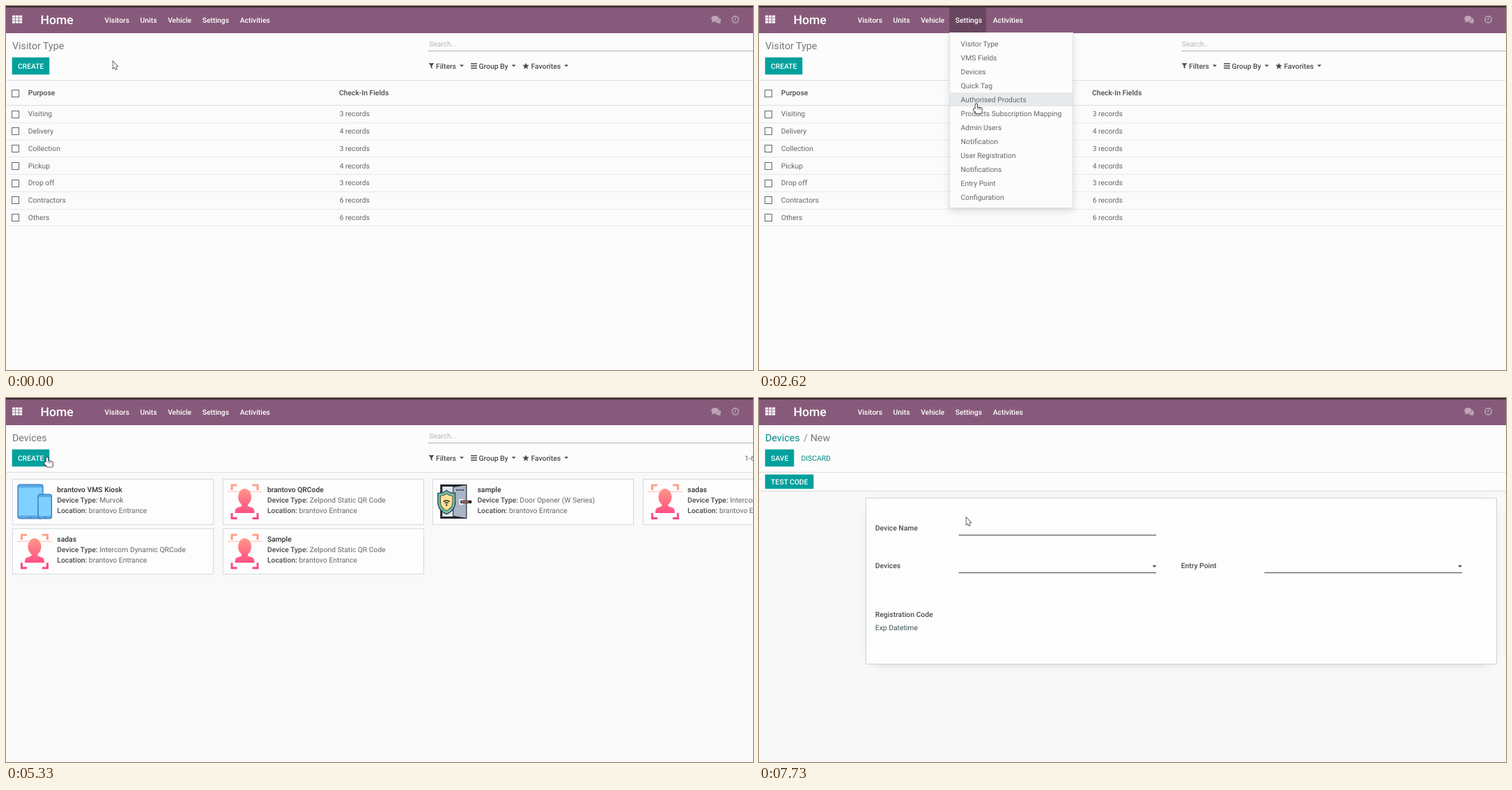
Animation, 1072 px wide and 522 px high, one loop 8 s. Source, as an HTML page with a canvas:

```html
<!DOCTYPE html>
<html lang="en">
<head>
<meta charset="utf-8">
<title>Device settings</title>
<style>
  html, body { margin: 0; width: 100%; height: 100%; overflow: hidden; background: #fcfcfc; }
  canvas { display: block; width: 1072px; height: 522px; }
</style>
</head>
<body>
<canvas id="stage" width="1072" height="522"></canvas>
<script>
const ctx = document.getElementById('stage').getContext('2d');
ctx.textRendering = 'geometricPrecision';
const WIDTH = 1072, HEIGHT = 522, LOOP = 8000;
const NAV = 39, HEAD = 106, BODY_SIZE = 10.35, TITLE_SIZE = 14.25;
const PURPLE = '#875a7b', TEAL = '#00a09d', DEEP_TEAL = '#008784', INK = '#666', DARK = '#4c4c4c';
const FOCUS = 130, MENU_OPEN = 2000, MENU_CLOSE = 4180, DEVICES = 4410, PRESS = 5790, FORM = 6100;
const STEP = 78, BLINK = 520;

const between = (t, a, b) => t >= a && t < b;
const inside = (x, y, l, top, r, b) => x >= l && x < r && y >= top && y < b;
const blinkOn = (t, since) => Math.floor((t - since) / BLINK) % 2 === 0;

function rect(x, y, w, h, color) {
  ctx.fillStyle = color;
  ctx.fillRect(x, y, w, h);
}
function frame(x, y, w, h, color) {
  ctx.strokeStyle = color;
  ctx.lineWidth = 1;
  ctx.strokeRect(x + .5, y + .5, w - 1, h - 1);
}
function path(d, fill, stroke, width = 1) {
  const p = new Path2D(d);
  if (stroke) { ctx.strokeStyle = stroke; ctx.lineWidth = width; ctx.stroke(p); }
  if (fill) { ctx.fillStyle = fill; ctx.fill(p); }
}
function oval(x, y, rx, ry, fill, stroke, width = 1) {
  ctx.beginPath();
  ctx.ellipse(x, y, rx, ry, 0, 0, 2 * Math.PI);
  if (stroke) { ctx.strokeStyle = stroke; ctx.lineWidth = width; ctx.stroke(); }
  if (fill) { ctx.fillStyle = fill; ctx.fill(); }
}
function text(str, x, midY, color = INK, weight = 400, size = BODY_SIZE) {
  ctx.font = `${weight} ${size}px Roboto, sans-serif`;
  ctx.fillStyle = color;
  ctx.fillText(str, x, midY + size * 0.355);
  return ctx.measureText(str).width;
}
const label = (str, x, y) => text(str, x, y, DARK, 500);
const title = (str, x, color = '#777') => text(str, x, 57, color, 400, TITLE_SIZE);
const rule = (y, color = '#dcddde') => rect(0, y, WIDTH, 1, color);
const arrowDown = (x, y) => path(`M${x - 3} ${y - 1.5}h6l-3 3z`, DARK);

function at(x, y, draw) {
  ctx.save();
  ctx.translate(x, y);
  draw();
  ctx.restore();
}
function raised(x, y, w, h, alpha, blur, dy) {
  ctx.save();
  ctx.shadowColor = `rgba(0,0,0,${alpha})`;
  ctx.shadowBlur = blur;
  ctx.shadowOffsetY = dy;
  rect(x, y, w, h, '#fcfcfc');
  ctx.restore();
}

const easeOut = power => p => 1 - (1 - p) ** power;
const smooth = p => p * p * (3 - 2 * p);
const REST = { x: 153, y: 79 };
const MOVES = [
  { from: 510, until: 1130, x: 282, y: 31, bend: -20, ease: easeOut(5) },
  { from: 2460, until: 2860, x: 318, y: 162, ease: easeOut(2.6) },
  { from: 2940, until: 3310, x: 319, y: 85, ease: smooth },
  { from: 3480, until: 3860, x: 317, y: 89, ease: smooth },
  { from: 4870, until: 5490, x: 56, y: 85, bend: 5, ease: easeOut(4) },
  { from: PRESS, until: 5950, x: 52, y: 85, ease: smooth },
  { from: FORM + STEP, until: 6880, x: 271, y: 158, bend: 8, ease: smooth },
  { from: 6960, until: 7260, x: 297, y: 171, ease: smooth }
];

function pointerAt(t) {
  let pos = REST;
  for (const { from, until, x, y, bend = 0, ease } of MOVES) {
    if (t < from) break;
    const gaps = Math.round((until - from) / STEP);
    const done = Math.floor((t - from) / (until - from) * gaps + .02) + 1;
    const p = ease(Math.min(1, done / (gaps + 1)));
    pos = {
      x: pos.x + (x - pos.x) * p,
      y: pos.y + (y - pos.y) * p + bend * Math.sin(Math.PI * p)
    };
  }
  return pos;
}

function handPointer() {
  const hand = new Path2D();
  for (let i = 0; i < 4; i++) hand.roundRect(-1.5 + i * 2.2, i && 4.5 + i * .5, 2.6, 9 - i * .5, 1.3);
  hand.roundRect(-1.5, 7, 9, 6.5, 2.5);
  hand.roundRect(-4, 6.5, 3.5, 4, 1.5);
  ctx.strokeStyle = '#222';
  ctx.lineWidth = 1.6;
  ctx.stroke(hand);
  ctx.fillStyle = '#fff';
  ctx.fill(hand);
  for (let i = 0; i < 3; i++) rect(.9 + i * 2.2, 5.5, .6, 3, '#555');
}

function drawPointer(t, { x, y }) {
  const onButton = between(t, DEVICES, FORM) && inside(x, y, 9, 74, 62, 98);
  const onMenu = between(t, MENU_OPEN, MENU_CLOSE) && y >= NAV;
  const onNav = t < MENU_CLOSE && inside(x, y, 273, 2, 326, NAV);
  at(x, y, () => {
    if (between(t, FORM, FORM + STEP)) path('M-2 -5.5h4M0 -5.5v11M-2 5.5h4', null, '#333');
    else if (onButton || onMenu || onNav) handPointer();
    else path('M.5 .5v10l2.2-2 1.6 3.5 1.5-.7-1.5-3.3 2.7-.4z', '#fff', '#333', 1.4);
  });
}

function drawNav(active) {
  rect(0, 0, WIDTH, NAV, PURPLE);
  rect(0, 0, WIDTH, 2, '#35272f');
  if (active) rect(273, 2, 53, NAV - 2, '#68465f');
  for (let i = 0; i < 9; i++) rect(9 + i % 3 * 5, 13.5 + Math.floor(i / 3) * 4, 4.2, 3.2, '#fff');
  text('Home', 49.5, 20, '#fff', 500, 17.6);
  let x = 141.5;
  for (const name of ['Visitors', 'Units', 'Vehicle', 'Settings', 'Activities'])
    x += text(name, x, 20, '#fff', 500) + 15.6;
  const soft = '#bda5b7';
  oval(1021.5, 20.5, 4.5, 3.6, soft);
  path('M1023 22l3 3.3-6-1.3z', soft);
  oval(1017.5, 18, 5.3, 4.1, soft, PURPLE, 1.2);
  path('M1014 20l-1.5 3.8 5.5-1.8z', soft);
  oval(1046.5, 19.3, 4.7, 4.7, null, soft, 1.6);
  path('M1046.8 16.5v3.3h-2.5', null, soft, 1.2);
}

function button(str, x, y, w, h, pressed) {
  if (pressed) rect(x - 2, y - 2, w + 4, h + 4, '#8fd2d0');
  rect(x - .3, y - .3, w + .6, h + .6, pressed ? DEEP_TEAL : TEAL);
  text(str, x + 8, y + h / 2, '#fff', 500);
}

function drawSearch(t) {
  text('Search...', 607, 54.5, '#b5b5b5');
  rect(606, 64, 466, 1, '#b0b0b0');
  const focused = t < MENU_OPEN || t >= DEVICES;
  if (focused && blinkOn(t, t < DEVICES ? FOCUS : DEVICES)) rect(608, 49, 1, 12, '#444');
  path('M606.5 82h8l-3 3.5v4.5l-2-1.7v-2.8z', DARK);
  for (let i = 0; i < 3; i++) rect(667, 82 + i * 3.2, 9, 1.5, DARK);
  ctx.beginPath();
  for (let i = 0; i < 10; i++) {
    const r = i % 2 ? 2.2 : 5, a = i * Math.PI / 5;
    ctx.lineTo(746 + r * Math.sin(a), 86.4 - r * Math.cos(a));
  }
  ctx.fillStyle = DARK;
  ctx.fill();
  const filters = { Filters: 617, 'Group By': 678.5, Favorites: 753.5 };
  for (const name in filters) arrowDown(filters[name] + label(name, filters[name], 86) + 8, 85.7);
}

function drawTable() {
  const rows = { Visiting: 3, Delivery: 4, Collection: 3, Pickup: 4, 'Drop off': 3, Contractors: 6, Others: 6 };
  const checkbox = y => frame(8, Math.round(y) - 5, 11, 11, INK);
  rect(0, HEAD, WIDTH, HEIGHT - HEAD, '#fbfbfb');
  title('Visitor Type', 9);
  button('CREATE', 9, 74, 53, 24);
  rule(HEAD);
  rule(142);
  checkbox(124.6);
  label('Purpose', 31.8, 124.3);
  label('Check-In Fields', 478, 124.3);
  Object.entries(rows).forEach(([name, count], i) => {
    const y = 154.7 + i * 24.75;
    checkbox(y);
    text(name, 31.8, y);
    text(count + ' records', 478.7, y);
    rule(Math.round(y + 12.2), '#e7e8e9');
  });
}

function drawMenu(pointerY) {
  const items = ['Visitor Type', 'VMS Fields', 'Devices', 'Quick Tag', 'Authorised Products',
    'Products Subscription Mapping', 'Admin Users', 'Notification', 'User Registration',
    'Notifications', 'Entry Point', 'Configuration'];
  const top = NAV - 1, rowTop = 44, rowHeight = 20;
  ctx.save();
  ctx.beginPath();
  ctx.rect(250, top, 230, 290);
  ctx.clip();
  raised(274, top, 176, 251, .14, 11, 4);
  frame(273, top - 1, 178, 253, '#dedede');
  const hover = Math.floor((pointerY - rowTop) / rowHeight);
  if (hover >= 0) rect(274, rowTop + hover * rowHeight, 176, rowHeight, '#e7eaed');
  items.forEach((item, i) => text(item, 289.6, rowTop + 10.2 + i * rowHeight));
  ctx.restore();
}

function kioskIcon() {
  const edge = '#3474b4';
  const device = (x, y, w, h, bezel) => {
    ctx.beginPath();
    ctx.roundRect(x, y, w, h, 3);
    ctx.fillStyle = '#5aa9e6';
    ctx.fill();
    ctx.strokeStyle = edge;
    ctx.lineWidth = 1.2;
    ctx.stroke();
    rect(x + 1, y + bezel, w - 2, h - bezel * 2, '#80d0ff');
    rect(x + w / 2 - 2, y + h - bezel / 2, 4, 1, edge);
  };
  device(1, 1, 36, 49, 4.5);
  device(30, 15, 19.5, 35, 4);
}

function faceIcon() {
  const pink = ctx.createLinearGradient(0, 0, 0, 51);
  pink.addColorStop(0, '#ffa68a');
  pink.addColorStop(.5, '#ff7084');
  pink.addColorStop(1, '#ff3f86');
  path('M6.5 9v-7h7.5M36 2h7.5v7M6.5 42v7.5h7.5M36 49.5h7.5v-7.5', null, pink, 3);
  rect(0, 10.5, 50, 1.6, '#ffd3c8');
  oval(25, 19, 9.5, 12, pink);
  rect(20.5, 27, 9, 8, pink);
  path('M11 42q0-7 3-7.5l7-2.5h8l7 2.5q3 .5 3 7.5z', pink);
}

function doorIcon() {
  const line = '#20232b';
  rect(4, 1, 38, 49, line);
  rect(7, 4, 16, 43, '#dfe5ef');
  path('M23 5l18-3v47l-18-3z', '#aab4c6', line, 2);
  for (let i = 0; i < 4; i++) rect(27 + i * 3, 8, 1.5, 2, line);
  rect(31, 22, 6, 8, '#e8edf4');
  rect(33, 24, 14, 4, line);
  rect(34, 25, 11, 2, '#c56d63');
  oval(47, 26, 2.3, 2.3, line);
  const shield = (scale, fill) => at(13, 26, () => {
    ctx.scale(scale, scale);
    path('M-12-12q7 0 12-4q5 4 12 4v12q0 12-12 17q-12-5-12-17z', fill, line, 2);
  });
  shield(1, '#6fbca9');
  shield(.7, '#ffe091');
  for (const r of [3, 6]) {
    ctx.beginPath();
    ctx.arc(13, 30, r, -2.4, -.75);
    ctx.strokeStyle = line;
    ctx.lineWidth = 1.5;
    ctx.stroke();
  }
  oval(13, 30.5, 1.2, 1.2, line);
}

function drawDevices(t) {
  const cards = [
    [kioskIcon, 'brantovo VMS Kiosk', 'Murvok'],
    [faceIcon, 'brantovo QRCode', 'Zelpond Static QR Code'],
    [doorIcon, 'sample', 'Door Opener (W Series)'],
    [faceIcon, 'sadas', 'Intercom Dynamic QRCode'],
    [faceIcon, 'sadas', 'Intercom Dynamic QRCode'],
    [faceIcon, 'Sample', 'Zelpond Static QR Code']
  ];
  rect(0, HEAD, WIDTH, HEIGHT - HEAD, '#f9f9f9');
  rule(HEAD);
  title('Devices', 9);
  button('CREATE', 9, 74, 53, 24, t >= PRESS);
  text('1-6 / 6', 1060, 86);
  cards.forEach(([icon, name, type], i) => {
    const x = 9 + i % 4 * 301.6, y = 116 + Math.floor(i / 4) * 71.3;
    rect(x, y, 289, 65, '#fdfdfd');
    frame(Math.round(x), Math.round(y), 289, 66, '#d6d9dd');
    at(x + 7, y + 7, icon);
    text(name, x + 64.3, y + 14.9, '#333', 500);
    Object.entries({ 'Device Type: ': type, 'Location: ': 'brantovo Entrance' }).forEach(([key, value], row) => {
      const lineY = y + 30 + row * 15.3;
      text(value, x + 64.3 + label(key, x + 64.3, lineY), lineY);
    });
  });
}

function drawForm(t) {
  const field = (name, x, y, underline) => {
    label(name, x, y + .5);
    if (underline) rect(x + 119.7, y + 10, 283.5, 1.2, '#5c5c5c');
  };
  rect(0, 134, WIDTH, HEIGHT - 134, '#f8f8f8');
  rule(HEAD);
  rule(133);
  title('Devices', 9, DEEP_TEAL);
  title('/', 64, '#888');
  title('New', 73.7);
  button('SAVE', 9, 74, 41, 24);
  text('DISCARD', 60.5, 86, DEEP_TEAL);
  button('TEST CODE', 9, 110, 69, 20);
  raised(166, 155, 880, 215, .5, 16, 4);
  rect(154, 143, 904, 239, '#fdfdfd');
  frame(153, 143, 906, 239, '#cfd4d9');
  field('Device Name', 166.8, 186, true);
  field('Devices', 166.8, 240, true);
  field('Entry Point', 605.7, 240, true);
  field('Registration Code', 166.8, 310);
  text('Exp Datetime', 166.8, 329.3, '#3c5254');
  arrowDown(1006, 241.5);
  if (t >= FORM + STEP) arrowDown(567.5, 241.5);
  if (blinkOn(t, FORM)) rect(287.6, 181, 1.2, 13, '#333');
}

function draw(t) {
  const pointer = pointerAt(t);
  const menuOpen = between(t, MENU_OPEN, MENU_CLOSE);
  rect(0, 0, WIDTH, HEIGHT, '#fcfcfc');
  if (t < DEVICES) drawTable();
  else if (t < FORM) drawDevices(t);
  else drawForm(t);
  if (t < FORM) drawSearch(t);
  drawNav(menuOpen || inside(pointer.x, pointer.y, 273, 2, 326, NAV));
  if (menuOpen) drawMenu(pointer.y);
  drawPointer(t, pointer);
}

function tick(now) {
  draw(now % LOOP);
  requestAnimationFrame(tick);
}
requestAnimationFrame(tick);
</script>
</body>
</html>
```
